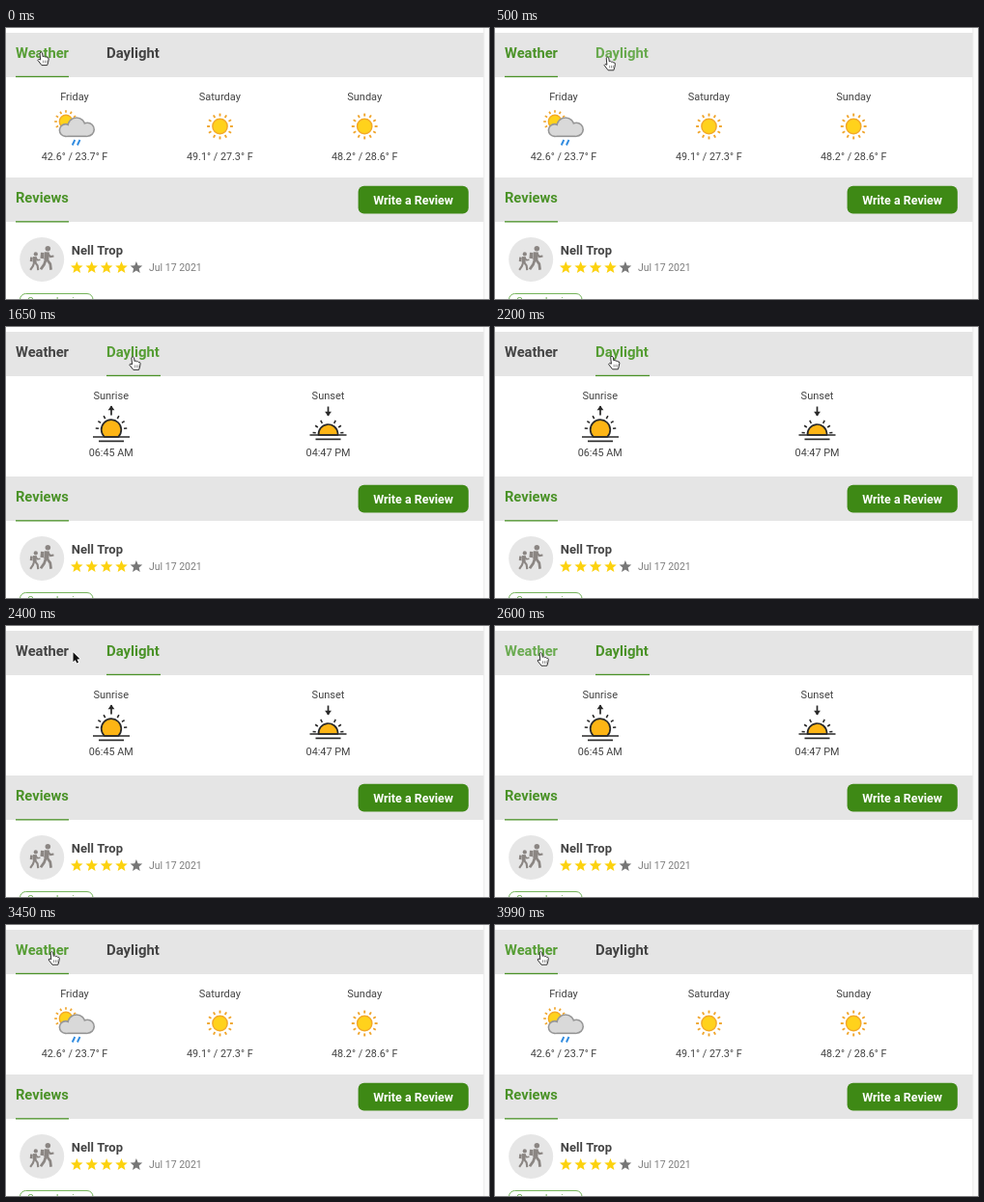
Animation, 500 px wide and 281 px high, one loop 4070 ms. Source, as an HTML page with a canvas:

```html
<!DOCTYPE html>
<html lang="en">
<head>
<meta charset="utf-8">
<title>Weather and daylight tabs</title>
<style>
html, body { margin: 0; width: 100%; height: 100%; overflow: hidden; background: #fff; }
canvas { display: block; width: 100vw; height: 100vh; }
</style>
</head>
<body>
<canvas id="stage"></canvas>
<script>
const W = 500, H = 281, LOOP = 4070, STEP = 50;
const GREEN = '#4a9227', HOVER = '#69aa4f', MIXED = '#559d33', DARK = '#434343', BAND = '#e5e5e5', INK = '#292929';
const canvas = document.getElementById('stage');
const ctx = canvas.getContext('2d');
const scale = window.devicePixelRatio || 1;
canvas.width = Math.round(W * scale);
canvas.height = Math.round(H * scale);

// Pointer tip: [ms, x, y]
const path = [
  [0, 36.3, 25], [50, 40, 25.3], [100, 43.5, 25.7], [150, 45.8, 26], [250, 45.8, 26],
  [300, 51, 26.5], [350, 62, 27.5], [400, 80, 28.5], [450, 101, 29.5], [500, 116.5, 30.2],
  [550, 124, 30.5], [600, 128.5, 30.7], [700, 131.2, 30.8], [2100, 131.2, 30.8],
  [2150, 129, 30.6], [2200, 121, 30.2], [2250, 108, 29.5], [2300, 92, 28.6], [2350, 79, 27.8],
  [2400, 69.5, 27.2], [2450, 60, 27], [2500, 53.5, 27.1], [2550, 49, 27.4], [2600, 47.4, 27.6]
];

function pointerAt(t) {
  const i = path.findIndex(p => p[0] > t);
  if (i < 0) return path[path.length - 1].slice(1);
  const a = path[i - 1], b = path[i], k = (t - a[0]) / (b[0] - a[0]);
  return [a[1] + (b[1] - a[1]) * k, a[2] + (b[2] - a[2]) * k];
}

function rect(x, y, w, h, color) {
  ctx.fillStyle = color;
  ctx.fillRect(x, y, w, h);
}

function text(str, x, y, size, color, weight = 400, align = 'left') {
  ctx.font = `${weight} ${size}px Roboto, sans-serif`;
  ctx.textAlign = align;
  ctx.fillStyle = color;
  ctx.fillText(str, x, y);
}

function disc(x, y, r, color) {
  ctx.fillStyle = color;
  ctx.beginPath();
  ctx.arc(x, y, r, 0, Math.PI * 2);
  ctx.fill();
}

function line(points, color, width) {
  ctx.strokeStyle = color;
  ctx.lineWidth = width;
  ctx.beginPath();
  points.forEach(([x, y]) => ctx.lineTo(x, y));
  ctx.stroke();
}

function rays(x, y, r1, r2, from, to, count, color, width) {
  for (let i = 0; i < count; i++) {
    const a = from + (to - from) * i / (count - 1);
    const c = Math.cos(a), s = Math.sin(a);
    line([[x + c * r1, y + s * r1], [x + c * r2, y + s * r2]], color, width);
  }
}

function sun(x, y, k = 1) {
  rays(x, y, 10.4 * k, 13.4 * k, 0, Math.PI * 11 / 6, 12, '#f0a52c', 1.9 * k);
  disc(x, y, 8.4 * k, '#f3aa27');
  disc(x, y, 6.9 * k, '#ffd21c');
}

function cloud(grow, color) {
  disc(61.8, 106, 5.6 + grow, color);
  disc(73, 102, 8.2 + grow, color);
  disc(84.2, 105.2, 6.2 + grow, color);
  rect(61.8, 103, 22.4, 8.5 + grow, color);
}

function rainyIcon() {
  sun(62, 97, 0.88);
  cloud(1.6, '#969696');
  cloud(0, '#d9d9d9');
  for (const x of [70, 75.2]) line([[x + 1.3, 116], [x - 1.3, 121.5]], '#2f8be0', 1.9);
}

// A disc cut off by the horizon; rise lifts its centre above that line.
function horizonSun(x, base, r, rise) {
  const y = base - rise, dip = Math.asin(rise / r);
  ctx.beginPath();
  ctx.arc(x, y, r, Math.PI - dip, dip);
  ctx.closePath();
  ctx.fillStyle = '#fdb515';
  ctx.fill();
  ctx.strokeStyle = INK;
  ctx.lineWidth = 1.7;
  ctx.stroke();
  rays(x, y, r + 2.8, r + 6, Math.PI * 1.03, Math.PI * 1.34, 3, INK, 1.6);
  rays(x, y, r + 2.8, r + 6, Math.PI * 1.66, Math.PI * 1.97, 3, INK, 1.6);
  line([[x - 19, base], [x + 19, base]], INK, 1.7);
  line([[x - 13, base + 4.4], [x + 13, base + 4.4]], INK, 1.7);
}

function shaft(x, tip, dir) {
  line([[x, tip], [x, tip + dir * 9.5]], INK, 1.7);
  ctx.beginPath();
  ctx.moveTo(x, tip - dir * 0.4);
  ctx.lineTo(x - 3.4, tip + dir * 4.2);
  ctx.lineTo(x + 3.4, tip + dir * 4.2);
  ctx.fillStyle = INK;
  ctx.fill();
}

function star(x, y, color) {
  ctx.fillStyle = color;
  ctx.beginPath();
  for (let i = 0; i < 10; i++) {
    const a = -Math.PI / 2 + i * Math.PI / 5, r = i % 2 ? 2.9 : 6.6;
    ctx.lineTo(x + r * Math.cos(a), y + r * Math.sin(a));
  }
  ctx.closePath();
  ctx.fill();
}

function hiker(x, y, k, color) {
  const part = (pts, w) => line(pts.map(([px, py]) => [x + px * k, y + py * k]), color, w * k);
  disc(x + 1 * k, y - 10 * k, 2.7 * k, color);
  part([[0, -6.5], [-0.5, 1.5]], 5);
  part([[-4.5, -6], [-5, 0]], 3.4);
  part([[1, -5], [3.5, -1.8], [7, -2.5]], 2.1);
  part([[0, 1], [3.4, 5.5], [4.2, 11.5]], 2.7);
  part([[-1, 1], [-2.7, 6], [-6.2, 11]], 2.7);
}

function forecast() {
  const days = [
    ['Friday', '42.6° / 23.7° F', 71],
    ['Saturday', '49.1° / 27.3° F', 221.3],
    ['Sunday', '48.2° / 28.6° F', 371.2]
  ];
  for (const [day, temps, x] of days) {
    text(day, x, 75, 11, DARK, 400, 'center');
    text(temps, x, 137, 10.8, DARK, 400, 'center');
  }
  rainyIcon();
  sun(221.5, 102);
  sun(371.2, 102);
}

function daylight() {
  text('Sunrise', 108.7, 75, 11, DARK, 400, 'center');
  text('06:45 AM', 108.7, 134, 10.8, DARK, 400, 'center');
  text('Sunset', 333.5, 75, 11, DARK, 400, 'center');
  text('04:47 PM', 333.5, 134, 10.8, DARK, 400, 'center');
  horizonSun(109, 114, 10.3, 7.5);
  shaft(109, 82, 1);
  horizonSun(333.5, 112, 10, 1);
  shaft(333.5, 92, -1);
}

function tabColor(active, hovered) {
  if (active) return hovered ? MIXED : GREEN;
  return hovered ? HOVER : DARK;
}

function underline(x, y, w) {
  rect(x, y, w, 1.3, GREEN);
}

function reviews() {
  rect(0, 155, 494.5, 46, BAND);
  text('Reviews', 10, 180.7, 14.7, GREEN, 600);
  underline(10, 200.2, 55);
  ctx.fillStyle = '#3e8915';
  ctx.beginPath();
  ctx.roundRect(364.6, 163.8, 114.2, 28.7, 6);
  ctx.fill();
  text('Write a Review', 421.6, 182.5, 12.5, '#fff', 600, 'center');

  disc(37.2, 240, 23, '#e6e6e6');
  hiker(42.3, 239, 1.02, '#8b8683');
  hiker(30, 242.2, 0.78, '#8b8683');
  text('Nell Trop', 67.8, 235.2, 13, DARK, 600);
  for (let i = 0; i < 5; i++) star(73.3 + i * 15.4, 248.6, i < 4 ? '#fcd20e' : '#777');
  text('Jul 17 2021', 148, 252.2, 10.5, '#7d7d7d');

  ctx.strokeStyle = '#74b45a';
  ctx.lineWidth = 1;
  ctx.beginPath();
  ctx.roundRect(14.5, 275.5, 75.5, 16, 6);
  ctx.stroke();
  text('Snowshoeing', 52, 285.7, 9.9, '#62a747', 400, 'center');
}

function hand(x, y) {
  ctx.save();
  ctx.translate(x, y);
  ctx.beginPath();
  ctx.moveTo(-1.3, 1);
  ctx.quadraticCurveTo(0, -1, 1.3, 1);
  ctx.lineTo(1.8, 4.6);
  ctx.quadraticCurveTo(3.2, 3.6, 4, 5);
  ctx.quadraticCurveTo(5.4, 4.3, 6, 5.7);
  ctx.quadraticCurveTo(7.7, 5.2, 7.9, 7);
  ctx.lineTo(7.4, 10.2);
  ctx.lineTo(6.4, 13.6);
  ctx.lineTo(0.6, 13.6);
  ctx.lineTo(-3.4, 8.4);
  ctx.quadraticCurveTo(-3, 6.5, -0.6, 8);
  ctx.closePath();
  ctx.fillStyle = '#fff';
  ctx.fill();
  ctx.strokeStyle = '#333';
  ctx.lineWidth = 1;
  ctx.stroke();
  for (const fx of [2.1, 4, 5.8]) line([[fx, 8.6], [fx, 11.4]], '#555', 0.6);
  ctx.restore();
}

function arrow(x, y) {
  ctx.beginPath();
  for (const [dx, dy] of [[0, 0], [0, 10], [2.3, 8], [3.8, 11.4], [5.5, 10.6], [4, 7.3], [7, 7]])
    ctx.lineTo(x + dx, y + dy);
  ctx.closePath();
  ctx.strokeStyle = '#fff';
  ctx.lineWidth = 1.6;
  ctx.stroke();
  ctx.fillStyle = '#111';
  ctx.fill();
}

function ring(x, y) {
  ctx.strokeStyle = '#161616';
  ctx.lineWidth = 2;
  ctx.beginPath();
  ctx.arc(x, y, 22.7, 0, Math.PI * 2);
  ctx.stroke();
}

function draw(t) {
  const [x, y] = pointerAt(t);
  const onWeather = x < 65, onDaylight = x > 103;
  const showDaylight = t >= 1550 && t < 3450;
  ctx.setTransform(canvas.width / W, 0, 0, canvas.height / H, 0, 0);
  ctx.lineJoin = 'round';
  rect(0, 0, W, H, '#fff');
  rect(0, 5, 494.5, 46, BAND);
  text('Weather', 10, 30.7, 14.7, tabColor(!showDaylight, onWeather), 600);
  text('Daylight', 104, 30.7, 14.9, tabColor(showDaylight, onDaylight), 600);
  if (showDaylight) {
    underline(104, 49.8, 56);
    daylight();
  } else {
    underline(10, 49.8, 55);
    forecast();
  }
  reviews();
  rect(494.5, 0, 1, H, '#e3e3e3');
  rect(495.5, 0, 4.5, H, '#fafafa');
  if (onWeather || onDaylight) hand(x, y); else arrow(x, y);
  if (t >= 1100 && t < 1550) ring(131.5, 31);
  if (t >= 3150 && t < 3450) ring(47.9, 28.1);
}

const start = performance.now();
function tick() {
  const t = (performance.now() - start) % LOOP;
  draw(Math.floor(t / STEP) * STEP);
  requestAnimationFrame(tick);
}
tick();
</script>
</body>
</html>
```
